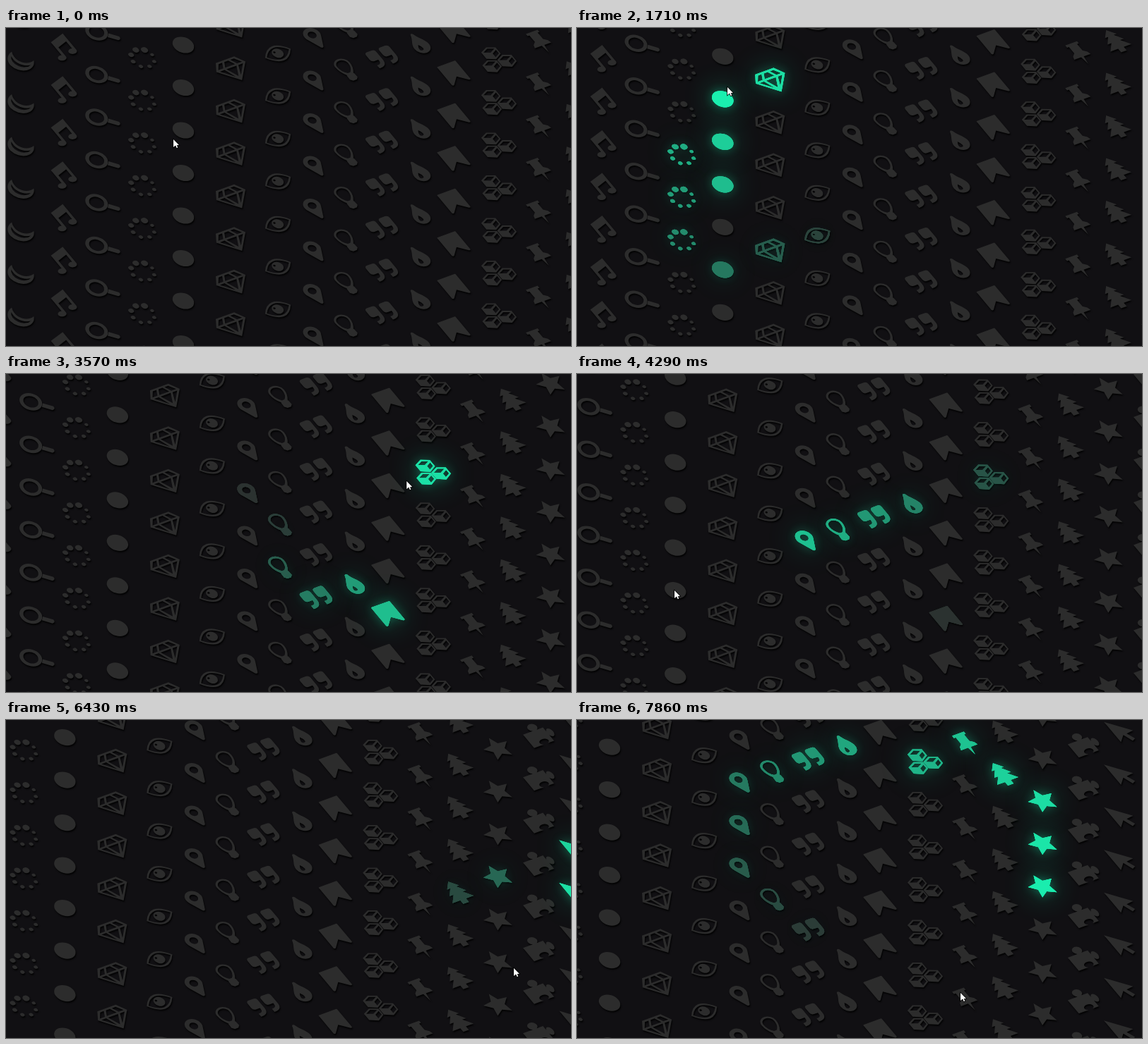
These frames come from a looping animation (800x451 px, 8 s). An HTML page with a canvas:

```html
<!DOCTYPE html>
<html lang="en">
<head>
<meta charset="utf-8">
<title>Icon wall</title>
<style>
  html, body { margin: 0; height: 100%; overflow: hidden; background: #111013; }
  canvas { display: block; }
</style>
</head>
<body>
<canvas width="800" height="451"></canvas>
<script>
const ctx = document.querySelector('canvas').getContext('2d');

const LOOP = 8000, FPS = 7, FADE = 1;
const PITCH = 60.5, SPEED = 26.08, SLOPE = Math.tan(Math.PI / 9);
const SIZE = 0.385;
// Icon plane: rotated by -20 degrees, then skewed by 20 degrees
const PLANE = [0.94, -0.342, 0.684, 0.816].map(v => v * SIZE);
const GREY = [44, 44, 44], GREEN = [26, 240, 176];

// Outline helpers, 100 units to the em, filled with the even-odd rule
const pairs = v => v.flatMap((x, i) => i % 2 ? [] : [[x, v[i + 1]]]);
const flip = points => points.map(([x, y]) => [-x, y]);
const polygon = points => `M${points.join('L')}Z`;
const mirror = (...v) => polygon([...pairs(v), ...flip(pairs(v)).reverse()]);
const twins = (...v) => polygon(pairs(v)) + polygon(flip(pairs(v)));
const range = n => [...Array(n).keys()];
const polar = (angle, r) => [r * Math.sin(angle), -r * Math.cos(angle)];
const dot = (x, y, r) => `M${x - r},${y}a${r},${r} 0 1 0 ${2 * r},0a${r},${r} 0 1 0 ${-2 * r},0Z`;
const lens = (w, h) => `M${-w},0Q${-w / 2},${-h} 0,${-h}T${w},0Q${w / 2},${h} 0,${h}T${-w},0Z`;
const shell = (w, h, neck, end) =>
  `M${-neck},${end}Q${-w},4 ${-w},-18A${w},${h} 0 0 1 ${w},-18Q${w},4 ${neck},${end}Z`;
const mark = x => `M${x},-36h18q11,0 11,11v33q0,28-28,28h-4v-14h4q14,0 14-14v-4h-15q-11,0-11-11v-18q0-11 11-11Z`;
const cube = (x, y) => `M${x},${y - 26}l28,12v28l-28,14l-28-14v-28Z
  M${x},${y - 20}l21,9l-21,9l-21-9Z M${x + 4},${y + 4}l19-9v16l-19,9Z`;

const moon = 'M-4-42C-30-36-43-15-42,4A43,43 0 0 0 40,16C14,26-24,4-4-42ZM-17-27A34,34 0 0 0 20,28C-6,26-24,4-17-27Z';
const music = 'M-15-30L43-46V28A15,11 0 1 1 33,17.6V-14L-5-3V38A15,11 0 1 1-15,27.6Z';
const search = dot(-8, -8, 36) + dot(-8, -8, 24) + 'M12,24L24,12 48,36Q49,49 36,48Z';
const spinner = [10.7, 11.5, 6, 6.5, 7, 7, 7.5, 8.9]
  .map((r, i) => dot(...polar(i * Math.PI / 4, 37), r)).join('');
const disc = dot(0, 0, 34);
const gem = mirror(36, -46, 57, -14, 0, 46) + mirror(19.5, -11, 0, 27) + mirror(7.6, -39, 19, -18)
  + twins(27, -11, 45, -11, 10.5, 26) + twins(16, -39, 30, -39, 46, -18, 27, -18);
const eye = lens(50, 32) + lens(43, 25) + dot(0, -1, 19) + dot(-8, -8, 4);
const marker = 'M-29-14A29,29 0 0 1 29-14Q29-6 25,0L5,40Q0,46-5,40L-25,0Q-29-6-29-14Z' + dot(0, -14, 14);
const bulb = shell(28, 26, 12, 24) + shell(21, 19, 5, 17) + mirror(14, 24, 15, 42, 7, 50);
const quotes = mark(-35) + mark(17);
const drop = 'M0-43Q5-43 7-34C14-16 28-4 28,14A28,28 0 0 1-28,14C-28-4-14-16-7-34Q-5-43 0-43Z'
  + 'M-7,4Q0,14 0,21A7,7 0 0 1-14,21Q-14,14-7,4Z';
const bookmark = mirror(34, -43, 36, -41, 36, 39, 33, 42, 29, 41, 0, 14);
const cubes = cube(0, -23) + cube(-29, 23) + cube(29, 23);
const pin = mirror(23, -43, 23, -33, 16, -33, 16, -4, 28, 6, 32, 18, 5, 18, 0, 50);
const tree = mirror(0, -50, 23, -24, 11, -24, 32, 2, 17, 2, 41, 30, 11, 30, 11, 46);
const star = polygon(range(10).map(i => polar(i * Math.PI / 5, i % 2 ? 23 : 48)));
const puzzle = 'M-46-14H-8a17,15 0 1 1 16,0H32v18a11,17 0 1 1 0,16V46H8a17,11 0 1 0-16,0H-46Z';
const arrow = polygon(pairs([-33, -50, 33, 16, 6, 19, 19, 46, 6, 52, -8, 20, -33, 42]));

// One column per icon: starting x, y of row 0, outline
const columns = [
  [21, 47, moon], [82, 27, music], [137, 5.5, search], [193, 42, spinner], [251, 24, disc], [318, 57, gem],
  [385, 36, eye], [435, 14, marker], [481, 59, bulb], [532, 41, quotes], [587, 22, drop], [634, 64, bookmark],
  [698, 45, cubes], [754, 18.5, pin], [811, 63, tree], [864, 40.5, star], [922, 22, puzzle], [973, 3, arrow]
].map(([x, y, d]) => ({ x, y, path: centred(d) }));

// Projects an outline onto the plane and centres its visible box
function centred(d) {
  const outline = document.createElementNS('http://www.w3.org/2000/svg', 'path');
  outline.setAttribute('d', d);
  const [a, b, c, e] = PLANE, length = outline.getTotalLength();
  const points = range(400).map(i => outline.getPointAtLength(length * i / 400));
  const middle = v => (Math.min(...v) + Math.max(...v)) / 2;
  const dx = middle(points.map(p => a * p.x + c * p.y));
  const dy = middle(points.map(p => b * p.x + e * p.y));
  const path = new Path2D();
  path.addPath(new Path2D(d), new DOMMatrix([a, b, c, e, -dx, -dy]));
  return path;
}

// The pointer brushes over [column, row] cells at an even pace between two times
const touches = [];
function sweep(from, to, ...cells) {
  cells.forEach(([column, row], i) =>
    touches.push({ time: from + (to - from) * i / (cells.length - 1), column, row }));
}
const down = (column, first, count) => range(count).map(i => [column, first + i]);

sweep(0.14, 0.6, [4, 2], [5, 2], [6, 3]);
sweep(0.83, 1.1, [6, 4], [5, 4], [4, 5]);
sweep(1.2, 1.71, ...down(3, 2, 3).reverse(), [4, 3], [4, 2], [5, 0], [4, 1]);
sweep(1.9, 1.98, [5, 0], [6, 0]);
sweep(2.35, 2.6, ...down(7, 0, 3));
sweep(2.66, 2.98, [8, 2], [8, 3], [9, 4]);
sweep(3.14, 3.49, [10, 4], [11, 4], [12, 1]);
sweep(3.73, 4.04, [10, 2], [9, 2], [8, 2], [7, 3]);
sweep(4.36, 4.92, [5, 3], [5, 2], [6, 3]);
sweep(5.07, 5.13, [7, 4], [8, 3]);
sweep(5.58, 5.73, [14, 2], [15, 2]);
sweep(6.28, 6.34, ...down(17, 2, 2));
sweep(6.6, 6.75, [13, 4], [11, 4]);
sweep(6.94, 7.25, [9, 3], [8, 2], ...down(7, 0, 3).reverse());
sweep(7.33, 7.7, ...[8, 9, 10, 12, 13, 14].map(column => [column, -1]));
sweep(7.76, 7.84, ...down(15, 0, 3));

function place(column, row, t) {
  const shift = SPEED * t;
  return [columns[column].x - shift, columns[column].y + PITCH * row + shift * SLOPE];
}

// Pointer path: seconds, x, y
const trail = [
  [0, 237, 158], [12 / 7, 213, 84], [3, 509, 310], [30 / 7, 138, 307],
  [36 / 7, 337, 316], [45 / 7, 719, 352], [55 / 7, 543, 387],
  ...touches.map(({ time, column, row }) => [time, ...place(column, row, time)])
].sort((p, q) => p[0] - q[0]);

function pointerAt(t) {
  const next = trail.findIndex(p => p[0] > t);
  if (next < 0) return trail[trail.length - 1].slice(1);
  const [t0, x0, y0] = trail[next - 1], [t1, x1, y1] = trail[next];
  const k = (t - t0) / (t1 - t0);
  return [x0 + (x1 - x0) * k, y0 + (y1 - y0) * k];
}

function glowOf(column, row, t) {
  const ages = touches.filter(o => o.column === column && o.row === row && o.time <= t).map(o => t - o.time);
  return Math.max(0, 1 - Math.min(...ages) / FADE);
}

function fillIcon(path, colour, shadow, blur, dx = 0, dy = 0) {
  ctx.fillStyle = colour;
  ctx.shadowColor = shadow;
  ctx.shadowBlur = blur;
  ctx.shadowOffsetX = dx;
  ctx.shadowOffsetY = dy;
  ctx.fill(path, 'evenodd');
}

function drawIcon(column, row, t) {
  const [x, y] = place(column, row, t);
  if (x < -40 || x > 840 || y < -40 || y > 491) return;
  const glow = glowOf(column, row, t), { path } = columns[column];
  const colour = `rgb(${GREY.map((v, i) => Math.round(v + (GREEN[i] - v) * glow))})`;
  ctx.save();
  ctx.translate(x, y);
  fillIcon(path, colour, `rgba(0,0,0,${0.85 * (1 - glow)})`, 2, 1, 2);
  if (glow) {
    fillIcon(path, colour, `rgba(${GREEN},${0.5 * glow})`, 40);
    fillIcon(path, colour, `rgba(${GREEN},${0.4 * glow})`, 14);
  }
  ctx.restore();
}

const cursor = new Path2D();
cursor.addPath(new Path2D(arrow), new DOMMatrix([0.12, 0, 0, 0.12, 4, 6]));

function draw(t) {
  ctx.fillStyle = '#111013';
  ctx.fillRect(0, 0, 800, 451);
  columns.forEach((_, column) => {
    for (let row = -3; row < 9; row++) drawIcon(column, row, t);
  });
  ctx.save();
  ctx.translate(...pointerAt(t));
  ctx.strokeStyle = '#000';
  ctx.lineWidth = 1.5;
  ctx.stroke(cursor);
  ctx.fillStyle = '#fff';
  ctx.fill(cursor);
  ctx.restore();
}

let shown = -1;
function tick() {
  const step = Math.min(55, Math.floor((performance.now() % LOOP + 5) * FPS / 1000));
  if (step !== shown) draw((shown = step) / FPS);
  requestAnimationFrame(tick);
}
tick();
</script>
</body>
</html>
```
